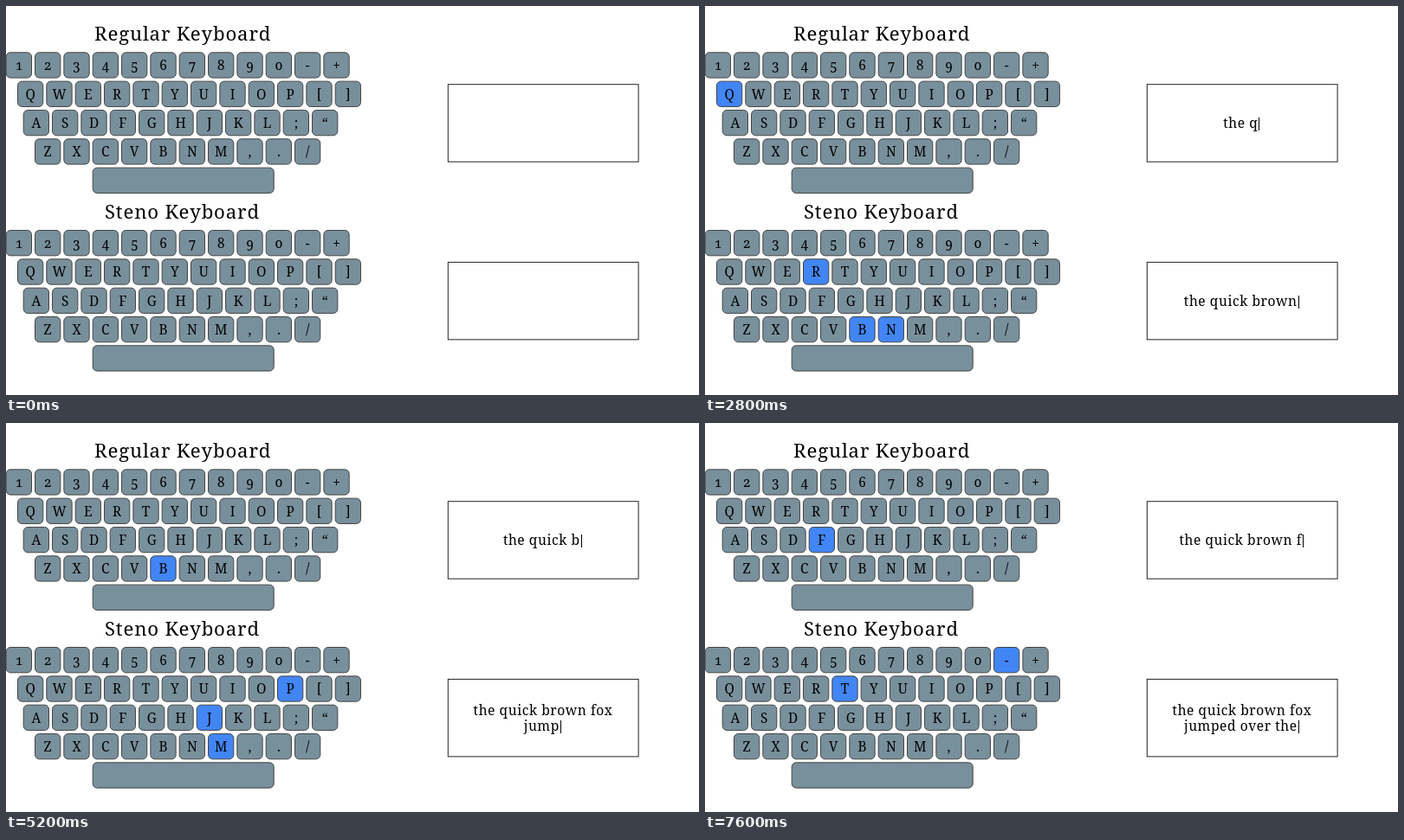
These frames come from a looping animation (800x450 px, 8 s). An HTML page:

```html
<!DOCTYPE html>
<html lang="en">
<head>
<meta charset="utf-8">
<title>Regular and steno typing</title>
<style>
  html, body { margin: 0; width: 100%; height: 100%; overflow: hidden; background: #fff; }
  #stage { position: relative; width: 800px; height: 450px; overflow: hidden; color: #000;
    font-family: "Noto Serif", serif; font-weight: 300; font-variant-numeric: oldstyle-nums; }
  svg { position: absolute; left: 0; top: 0; }
  text { text-anchor: middle; font-size: 15.4px; }
  .title { font-size: 22.2px; letter-spacing: 0.85px; }
  .key { fill: #78909c; stroke: #434343; }
  .key.on { fill: #4285f4; }
  .page { position: absolute; left: 510px; width: 220px; height: 89.5px; display: flex;
    align-items: center; justify-content: center; text-align: center;
    font-size: 15.6px; letter-spacing: 0.55px; line-height: 18.6px; white-space: pre; }
  .caret { display: inline-block; width: 1px; height: 15px; margin: 0 1.5px 0 1px;
    background: #000; vertical-align: -3px; }
</style>
</head>
<body>
<div id="stage"><svg width="800" height="450"></svg></div>
<script>
const STEP = 400, LOOP = 8000, PITCH = 100 / 3, KEY = 29.3;
const ROWS = [[0, "1234567890-+"], [13.3, "QWERTYUIOP[]"], [20, "ASDFGHJKL;“"], [33.3, "ZXCVBNM,./"]];
const PHRASE = "the quick brown f";

// Pressed keys and the characters each stroke adds
const STROKES = [
  ["T-", "the"], [" ", " "], ["QK", "quick"], [" ", " "], ["BRN", "brown"], [" ", " "],
  ["F", "f"], ["O", "o"], ["X", "x"], [" ", " "],
  ["JMP", "jump"], ["E", "e"], ["D", "d"], [" ", " "], ["ROV", "over"], [" ", " "], ["T-", "the"]
];

const stage = document.getElementById("stage");
const svg = stage.firstElementChild;

function add(tag, attrs, text = "") {
  const node = document.createElementNS("http://www.w3.org/2000/svg", tag);
  for (const name in attrs) node.setAttribute(name, attrs[name]);
  node.textContent = text;
  return svg.appendChild(node);
}

function addKey(x, y, width) {
  return add("rect", { x, y, width, height: KEY, rx: 5, class: "key" });
}

function makeBoard(title, titleX, top) {
  add("text", { x: titleX, y: top - 14, class: "title" }, title);
  const keys = {};
  ROWS.forEach(([left, chars], row) => [...chars].forEach((char, col) => {
    const x = left + 0.2 + col * PITCH, y = top + row * PITCH;
    keys[char] = addKey(x, y, KEY);
    add("text", { x: x + KEY / 2, y: y + 20.6 }, char);
  }));
  keys[" "] = addKey(100.2, top + 4 * PITCH, 209);

  const boxTop = top + 36.9;
  add("rect", { x: 510.3, y: boxTop, width: 219.8, height: 89.5, fill: "#fff", stroke: "#222" });
  const page = document.createElement("div");
  page.className = "page";
  page.style.top = boxTop + "px";
  stage.append(page);
  return { keys, page };
}

function show({ keys, page }, pressed, text, caret) {
  for (const char in keys) keys[char].classList.toggle("on", pressed.includes(char));
  const line = document.createElement("div");
  line.textContent = text;
  if (caret) {
    const bar = document.createElement("span");
    bar.className = "caret";
    line.append(bar);
  }
  page.replaceChildren(line);
}

function stenoText(step) {
  // The first space only brings in the caret
  if (step === 2) return "the";
  return STROKES.slice(0, step).map(stroke => stroke[1]).join("").replace("fox j", "fox\nj");
}

const regular = makeBoard("Regular Keyboard", 204.1, 53.8);
const steno = makeBoard("Steno Keyboard", 203.4, 259.5);
let shown = -1;

function draw(now) {
  const step = Math.max(0, Math.floor(now % LOOP / STEP) - 2);
  if (step !== shown) {
    shown = step;
    show(regular, step ? PHRASE[step - 1].toUpperCase() : "", PHRASE.slice(0, step), step > 0);
    show(steno, step ? STROKES[step - 1][0] : "", stenoText(step), step > 1);
  }
  requestAnimationFrame(draw);
}
draw(performance.now());
</script>
</body>
</html>
```
